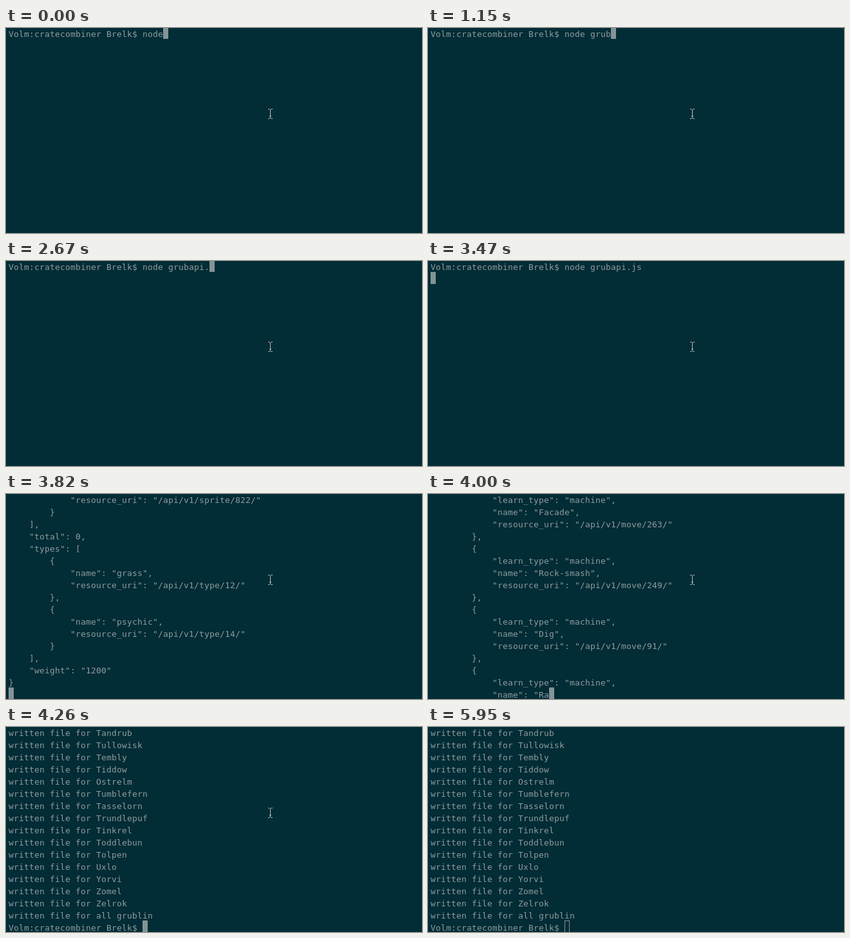
Animation, 646 px wide and 320 px high, one loop 5.97 s. Source, as an HTML page with a canvas:

```html
<!DOCTYPE html>
<html lang="en">
<head>
<meta charset="utf-8">
<title>Terminal</title>
<style>
html, body { margin: 0; width: 100%; height: 100%; overflow: hidden; background: #022c36; }
canvas { display: block; }
</style>
</head>
<body>
<canvas id="stage" width="646" height="320"></canvas>
<script>
const ctx = document.getElementById('stage').getContext('2d');
const LOOP = 5970, COL = 8, ROW = 19, LEFT = 4, ROWS = 17;
const BG = '#022c36', INK = '#8f9d9e', CURSOR = '#839496';

const prompt = 'Volm:cratecombiner Brelk$ ';
const command = 'node grubapi.js';

// [time, number of characters typed]
const keys = [[0, 4], [530, 5], [890, 7], [970, 8], [1150, 9], [2040, 10],
  [2310, 11], [2400, 12], [2670, 13], [2930, 14], [3110, 15]];

const indent = (n, text) => ' '.repeat(4 * n) + text;
const uri = path => indent(3, `"resource_uri": "/api/v1/${path}/"`);

const moves = [['Facade', 263], ['Rock-smash', 249], ['Dig', 91], ['Rain', 240],
  ['Rest', 156], ['Swift', 129], ['Headbutt', 29], ['Toxic', 92], ['Curse', 174]];
const stream = Array.from({ length: 18 }, (_, i) => moves[i % moves.length])
  .flatMap(([name, id]) => [
    indent(2, '{'),
    indent(3, '"learn_type": "machine",'),
    indent(3, `"name": "${name}",`),
    uri('move/' + id),
    indent(2, '},')
  ]);

// One screenful of the stream, cut off in its last line
const page = (from, cut) => {
  const lines = stream.slice(from, from + ROWS);
  lines[ROWS - 1] = lines[ROWS - 1].slice(0, cut);
  return lines;
};

const typeItem = (name, id, end) => [
  indent(2, '{'), indent(3, `"name": "${name}",`), uri('type/' + id), indent(2, end)
];
const summary = [
  uri('sprite/822'), indent(2, '}'), indent(1, '],'),
  indent(1, '"total": 0,'), indent(1, '"types": ['),
  ...typeItem('grass', 12, '},'), ...typeItem('psychic', 14, '}'),
  indent(1, '],'), indent(1, '"weight": "1200"'), '}', ''
];

const written = ('Tandrub Tullowisk Tembly Tiddow Ostrelm Tumblefern Tasselorn Trundlepuf ' +
  'Tinkrel Toddlebun Tolpen Uxlo Yorvi Zomel Zelrok').split(' ')
  .concat('all grublin').map(name => 'written file for ' + name);

// [time, lines on screen]; the cursor follows the last line
const screens = [
  ...keys.map(([t, n]) => [t, [prompt + command.slice(0, n)]]),
  [3470, [prompt + command, '']],
  [3740, page(23, 30)],
  [3820, summary],
  [3910, page(39, 27)],
  [4000, page(1, 23)],
  [4080, page(12, 34)],
  [4170, page(48, 25)],
  [4260, [...written, prompt]]
];

// [time, x, y] of the mouse pointer's centre; no place means hidden
const pointer = [[0, 410.5, 134], [4970, 468.5, 147], [5060, 596.5, 166.5], [5150]];

const at = (list, t) => list.findLast(step => step[0] <= t);

// Thin light I-beam with forked ends
function drawPointer(x, y) {
  const beam = new Path2D();
  for (const s of [-1, 1]) {
    for (const side of [-1, 1]) {
      beam.moveTo(x + 3.5 * side, y + 7.5 * s);
      beam.lineTo(x + 1.5 * side, y + 7.5 * s);
      beam.lineTo(x, y + 6 * s);
    }
  }
  beam.moveTo(x, y - 6);
  beam.lineTo(x, y + 6);
  beam.moveTo(x - 1.5, y + 3.5);
  beam.lineTo(x + 1.5, y + 3.5);
  ctx.lineWidth = 1;
  ctx.strokeStyle = '#b4bdbe';
  ctx.stroke(beam);
}

function draw(t) {
  ctx.fillStyle = BG;
  ctx.fillRect(0, 0, 646, 320);
  ctx.font = '13px "DejaVu Sans Mono", monospace';
  ctx.fillStyle = INK;

  const lines = at(screens, t)[1];
  lines.forEach((line, row) => [...line].forEach((ch, col) =>
    ctx.fillText(ch, LEFT + col * COL, row * ROW + 14)));

  const row = lines.length - 1;
  const x = LEFT + lines[row].length * COL, y = row * ROW - 2;
  ctx.fillStyle = CURSOR;
  ctx.fillRect(x, y, COL, ROW);
  if (t >= 5950) {
    ctx.fillStyle = BG;
    ctx.fillRect(x + 1, y + 1, COL - 2, ROW - 2);
  }

  const [, px, py] = at(pointer, t);
  if (px) drawPointer(px, py);
}

const start = performance.now();
function tick() {
  draw((performance.now() - start) % LOOP);
  requestAnimationFrame(tick);
}
tick();
</script>
</body>
</html>
```
